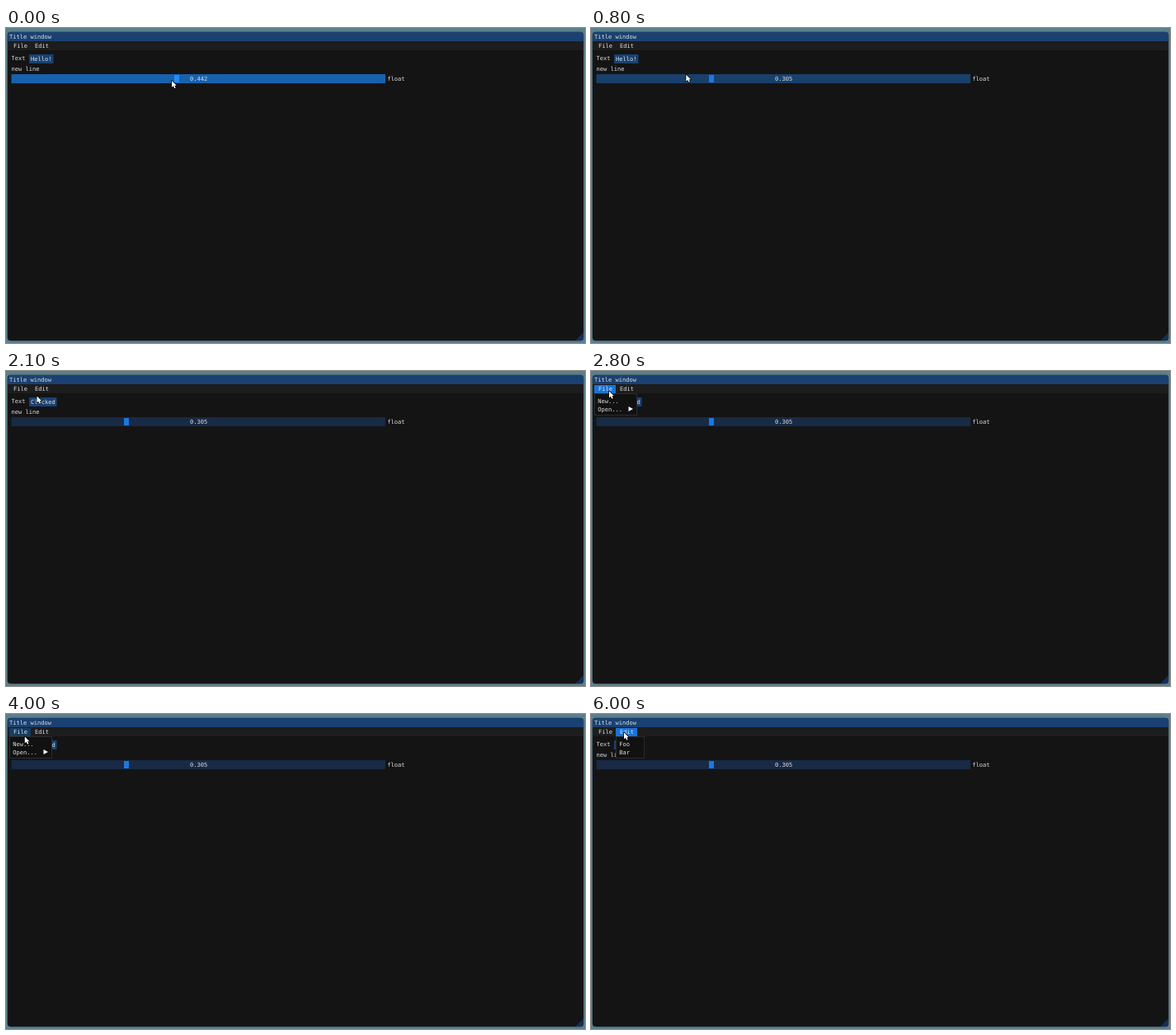
Animation of 702x382 px, one loop 6100 ms. Source, as an HTML page with a canvas:

```html
<!DOCTYPE html>
<html lang="en">
<head>
<meta charset="utf-8">
<title>Title window</title>
<style>
  html, body { margin: 0; width: 100%; height: 100%; overflow: hidden; background: #5c7f8b; }
  canvas { display: block; width: 702px; height: 382px; }
</style>
</head>
<body>
<canvas id="stage" width="702" height="382"></canvas>
<script>
const ctx = document.getElementById('stage').getContext('2d');
const LOOP = 6100;
const STEP = 100;

const color = {
  desk: '#5c7f8b', edge: '#33474f', body: '#141415', title: '#1a4172', bar: '#1d1d1e',
  popup: '#111112', line: '#2b2b2d', text: '#dedede', grip: '#16305a',
  frame: '#182a45', frameHover: '#19406b', frameActive: '#1762ae',
  knob: '#1b78e2', knobActive: '#1f8dfa',
  button: '#184272', buttonHover: '#178bff', buttonActive: '#0c80f2',
  header: '#183c62', headerHover: '#1a74d6'
};

// Pointer path: time, x, y
const path = [
  [0, 201, 64], [100, 180, 65], [300, 146, 66], [600, 146, 66],
  [900, 100, 52], [1200, 53, 36.5], [1900, 53, 36.5],
  [2300, 22, 24.5], [2800, 22, 24.5], [3400, 21, 39.5],
  [3500, 21, 44], [3600, 22, 47], [3700, 22, 47],
  [4100, 23, 21], [4200, 29, 16], [4300, 36, 18], [4400, 40, 22.5], [LOOP, 40, 22.5]
];

function pointerAt(t) {
  const i = path.findIndex(p => p[0] > t);
  const [t0, x0, y0] = path[i - 1], [t1, x1, y1] = path[i];
  const k = (t - t0) / (t1 - t0);
  return { x: x0 + (x1 - x0) * k, y: y0 + (y1 - y0) * k };
}

const between = (t, a, b) => t >= a && t < b;
const inside = (p, x, y, w, h) => p.x >= x && p.x < x + w && p.y >= y && p.y < y + h;

function rect(x, y, w, h, fill) {
  ctx.fillStyle = fill;
  ctx.fillRect(x, y, w, h);
}

function text(s, x, y) {
  ctx.fillStyle = color.text;
  ctx.fillText(s, x, y);
}

function triangle(fill, ...pts) {
  ctx.fillStyle = fill;
  ctx.beginPath();
  for (let i = 0; i < pts.length; i += 2) ctx.lineTo(pts[i], pts[i + 1]);
  ctx.fill();
}

function drawWindow() {
  rect(0, 0, 702, 382, color.desk);
  ctx.save();
  ctx.beginPath();
  ctx.roundRect(2, 5, 698, 374, 3.5);
  ctx.strokeStyle = color.edge;
  ctx.lineWidth = 1;
  ctx.stroke();
  ctx.clip();
  rect(2, 5, 698, 374, color.body);
  rect(2, 5, 698, 11, color.title);
  rect(2, 16, 698, 11, color.bar);
  triangle(color.grip, 700, 369.5, 700, 379, 690.5, 379);
  ctx.restore();
  text('Title window', 4, 13.3);
}

function drawMenuBar(open, mouse) {
  [['File', 4], ['Edit', 30]].forEach(([name, x]) => {
    const hover = inside(mouse, x, 16, 26, 11);
    if (hover || open === name) rect(x, 17, 26, 10, hover ? color.headerHover : color.header);
    text(name, x + 5, 24.4);
  });
}

function drawSlider(t, mouse) {
  const dragging = t < 500;
  const value = dragging ? 0.305 + 0.137 * Math.max(0, 1 - t / 300) : 0.305;
  const hover = inside(mouse, 6, 56, 454, 11);
  rect(6.5, 56, 453.5, 11, dragging ? color.frameActive : hover ? color.frameHover : color.frame);
  rect(Math.round(7 + value * 446), 57, 6, 9, dragging ? color.knobActive : color.knob);
  text(value.toFixed(3), 223, 64.3);
  text('float', 462.3, 64.3);
}

function drawContent(t, mouse) {
  text('Text', 6.5, 38.8);
  const label = t < 1600 ? 'Hello!' : 'Clicked';
  const w = t < 1600 ? 29.5 : 33.5;
  const fill = between(t, 1400, 1600) ? color.buttonActive
    : inside(mouse, 28, 32, w, 11) ? color.buttonHover : color.button;
  rect(28, 32, w, 11, fill);
  text(label, 30, 40.3);
  text('new line', 6.5, 52.2);
  drawSlider(t, mouse);
}

function drawPopup(x, y, w, items, lit) {
  const h = items.length * 10 + 7;
  rect(x, y, w, h, color.popup);
  ctx.strokeStyle = color.line;
  ctx.lineWidth = 1;
  ctx.strokeRect(x + 0.5, y + 0.5, w - 1, h - 1);
  items.forEach((item, i) => {
    const top = y + 4 + i * 10;
    if (i === lit) rect(x + 2, top, w - 4.5, 10, color.headerHover);
    text(item, x + 4.3, top + 7.7);
  });
}

function drawMenus(open, t, mouse) {
  if (open === 'File') {
    const nested = between(t, 3600, 3900);
    const lit = nested || inside(mouse, 4, 41, 52, 11) ? 1 : inside(mouse, 4, 31, 52, 10) ? 0 : -1;
    drawPopup(4, 27, 52, ['New...', 'Open...'], lit);
    triangle('#f4f4f4', 45.5, 43, 51, 46, 45.5, 49);
    if (nested) drawPopup(55, 37, 58, ['File.txt'], -1);
  } else if (open === 'Edit') {
    drawPopup(30, 27, 35, ['Foo', 'Bar'], -1);
  }
}

function drawPointer({ x, y }) {
  ctx.save();
  ctx.translate(x, y);
  ctx.beginPath();
  [[0, 0], [0, 8], [1.9, 6.3], [3.3, 9.2], [4.7, 8.6], [3.4, 5.8], [5.8, 5.7]]
    .forEach(p => ctx.lineTo(...p));
  ctx.closePath();
  ctx.strokeStyle = '#000';
  ctx.lineWidth = 1.5;
  ctx.lineJoin = 'round';
  ctx.stroke();
  ctx.fillStyle = '#fff';
  ctx.fill();
  ctx.restore();
}

function draw(now) {
  const t = Math.floor(now % LOOP / STEP) * STEP;
  const mouse = pointerAt(t);
  const open = between(t, 2500, 4300) ? 'File' : t >= 4300 ? 'Edit' : '';
  ctx.font = '7.07px "DejaVu Sans Mono", monospace';
  drawWindow();
  drawMenuBar(open, mouse);
  drawContent(t, mouse);
  drawMenus(open, t, mouse);
  drawPointer(mouse);
}

const start = performance.now();
function tick() {
  draw(performance.now() - start);
  requestAnimationFrame(tick);
}
tick();
</script>
</body>
</html>
```
